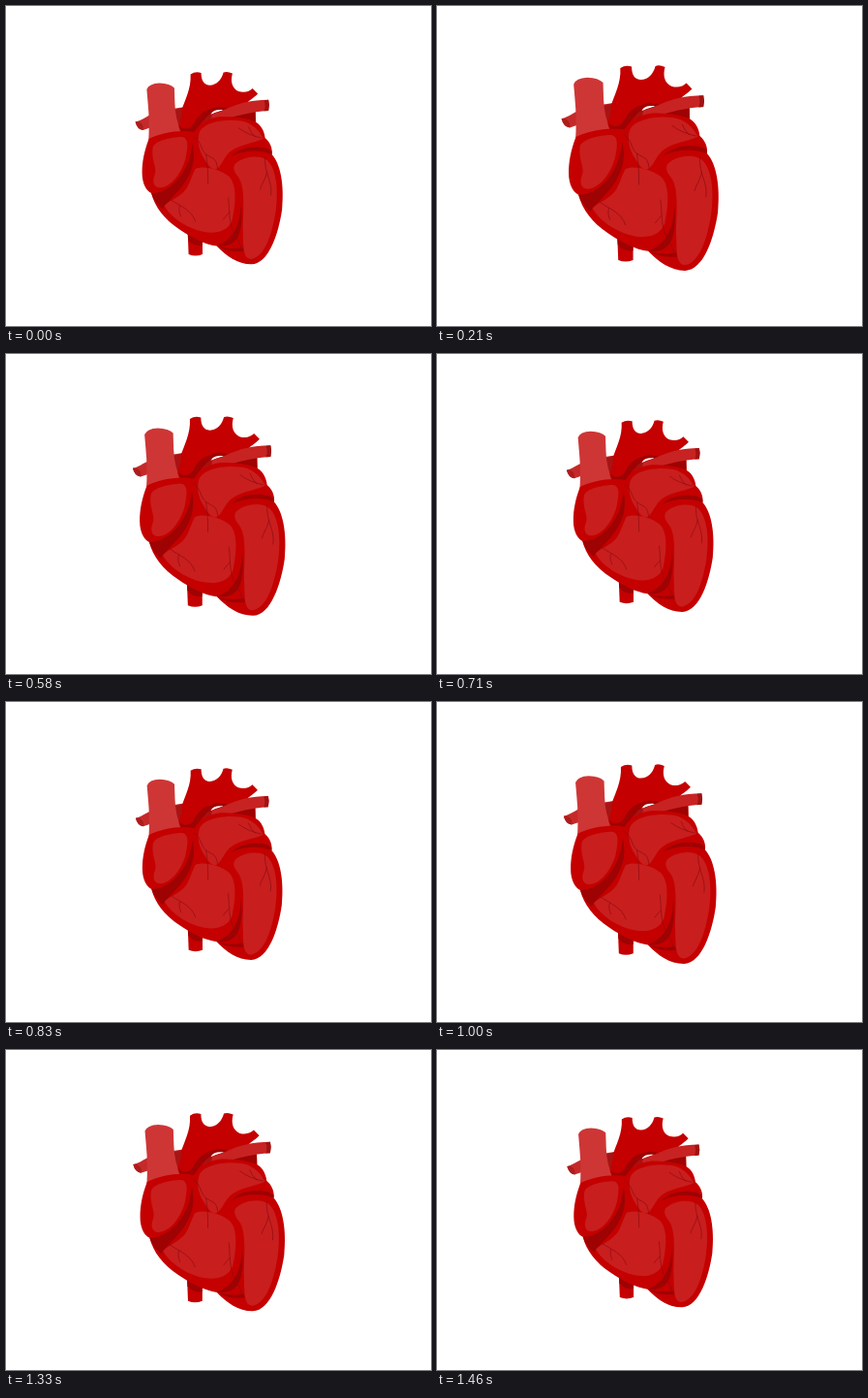
An HTML page that plays this animation: 439 by 330 pixels, repeating every 1500 ms.

```html
<!DOCTYPE html>
<html lang="en">
<head>
<meta charset="utf-8">
<title>Beating heart</title>
<style>
html, body { margin: 0; width: 100%; height: 100%; overflow: hidden; background: #fff; }
svg { display: block; width: 100vw; height: 100vh; }
.red { fill: #c40000; }
.light { fill: #c81e1e; }
.pale { fill: #ce3636; }
.dark { fill: #9e0202; }
.veins { fill: none; stroke: #8f0d12; stroke-width: .7; stroke-linecap: round; }
</style>
</head>
<body>
<svg viewBox="0 0 439 330">
  <g id="heart">
    <!-- lower vessel -->
    <path class="red" d="M188 230L189 256Q196 259 203.400 256L203.400 240Z"/>
    <path class="dark" d="M188 232L188.500 241Q194 248 203.400 247L203.400 240Z"/>

    <!-- vessels on the left -->
    <path fill="#c52a2a" d="M134 119.500C141 118 147 112.500 158 108L186 104V125L150 125.300L142 128Q136 127.500 134 119.500Z"/>
    <path fill="#ad1c1c" d="M134 119.500Q138 118.500 140 121Q143 124 142 128Q136 127.500 134 119.500Z"/>
    <path fill="#a81414" d="M174 107L186 104V134H180Q175 116 174 107Z"/>
    <path class="pale" d="M145.800 86Q148 80 159 79.500Q170 80 174.300 84.500L174.800 100Q175 116 182 132L147.500 142Q149 120 147 100Z"/>

    <!-- aorta -->
    <path class="red" d="M191 70.500Q196 67 202 69C202 77 205 81.500 211 81.700C218 81.500 223 76 225 68.500Q229 67 234.300 69.500C232 78 234 85 240.500 88C247 90 252 88 255 85L260.500 90.500C255 96 250 98 249 101L258 109L258.300 122L200 136L182 134L179 125C179 119 183 113 182 107C185 97 192 85 191 70.500Z"/>
    <path class="dark" d="M179 123C184 128 190 128 194 122C199 113 204 108 212 106C219 103 225 104 230 106L213 112C205 115 201 122 195 130L182 131Z"/>
    <path class="dark" d="M241 109L258 109L258.300 121Q245 116 234 115Z"/>
    <path fill="#fff" d="M212 111.500C214 107.500 219 106.500 225 107.300Q217 109.500 212 112Z"/>

    <!-- vessel on the right -->
    <path fill="#c72323" d="M204 121C208 111 216 111 226 107C241 100 253 97 271.500 96.800Q273 102 271.500 108C254 109 239 113 226 117L202 125Z"/>
    <path fill="#a01111" d="M267 97.200L271.500 96.800Q273 102 271.500 108L267 108.300Q269 103 267 97.200Z"/>
    <path fill="#a91010" d="M204 121Q207 112 213 111.500Q214 116 209 121L202 125Z"/>

    <!-- body -->
    <path class="red" d="M148 137C143 150 141 161 141 172C141 184 146 191 150.500 193C154 207 164 220 179 230C192 239 206 246 218 247.500C228 258 240 266.500 254 266.300C272 266 282 234 285.500 210C288 184 284 163 275 153C276 147 273 140 268 136C267 127 262 121 257 119C247 115 235 114 222 114C210 115 200 122 195 130C180 127 160 131 148 137Z"/>

    <!-- folds -->
    <path class="dark" d="M150.500 193C165 193 178 182 186 167C190 159 192 150 193 142C196 155 194 167 188 177C182 189 171 197 162 209C156 204 152 198 150.500 193Z"/>
    <path class="dark" d="M233 155C240 147 254 144.500 264 146Q272 147 275 150V153C261 147.500 245 149 233 155Z"/>
    <path class="dark" d="M243 203C243 224 236 241 218 247.300C229 249 236 245 240 238C244 229 245 216 243 203Z"/>
    <path class="dark" d="M219 248Q234 251.500 245 249L246 253Q230 254 219 248Z"/>

    <!-- panels -->
    <path class="light" d="M152 146C154 139 171 135 182 135C190 136 188 147 186 157C182 172 172 185 162 187C153 189 151 181 154 174C157 167 150 159 152 146Z"/>
    <path class="light" d="M200 131C204 118 235 115 249 120C258 124 264 131 266 137C254 142 240 143 231 151C225 157 223 165 218 168C211 170 207 160 203 154C199 146 198 138 200 131Z"/>
    <path class="light" d="M196 168C203 164 222 168 231 176C240 186 237 207 234 221C229 233 217 235 205 233C189 230 171 219 164 206C169 200 180 198 187 188C191 181 193 173 196 168Z"/>
    <path class="light" d="M237 163C245 155 262 153 270 159C280 168 282 190 279 212C275 236 268 258 254 261C244 261 246 245 245 228C246 205 247 185 240 176C235 170 235 166 237 163Z"/>

    <!-- surface veins -->
    <g class="veins">
      <path d="M195 135C203 141 201 148 207 153C214 158 218 156 219 168M207 153C209 164 209 174 209 183"/>
      <path d="M241 126Q250 133 264 136M251 125Q253 131 258 135"/>
      <path d="M268 156C267 174 276 180 274 195M270 171C268 180 264 184 263 189"/>
      <path d="M171 200C181 207 192 210 196 222M180 206Q178 210 181 217"/>
      <path d="M230 198C232 212 229 226 240 241M231 213Q228 216 225 220M240 241Q242 247 245 252"/>
    </g>
  </g>
</svg>
<script>
const LOOP = 1500;
const heart = document.getElementById("heart");

// Beat curve: [time in ms, scale]
const beat = [
  [0, 1], [210, 1.066], [335, 1.089], [460, 1.073], [580, 1.036],
  [770, 0.989], [830, 0.996], [1000, 1.036], [1080, 1.069],
  [1150, 1.088], [1210, 1.079], [1330, 1.03], [1460, 0.99]
];

function key(i) {
  const n = beat.length;
  const turn = Math.floor(i / n);
  const [t, s] = beat[i - turn * n];
  return [t + turn * LOOP, s];
}

function slope(i) {
  const [a, b, c] = [key(i - 1), key(i), key(i + 1)];
  if ((b[1] - a[1]) * (c[1] - b[1]) <= 0) return 0;
  return (c[1] - a[1]) / (c[0] - a[0]);
}

function scaleAt(t) {
  let i = 0;
  while (key(i + 1)[0] <= t) i++;
  const [t0, s0] = key(i);
  const [t1, s1] = key(i + 1);
  const d = t1 - t0, u = (t - t0) / d, v = 1 - u;
  return s0 * v * v * (1 + 2 * u) + s1 * u * u * (3 - 2 * u)
    + d * u * v * (slope(i) * v - slope(i + 1) * u);
}

function draw(t) {
  const s = scaleAt(t % LOOP);
  heart.setAttribute("transform", `translate(209.6 167) scale(${s.toFixed(4)}) translate(-210 -167)`);
}

const start = performance.now();
function tick() {
  draw(performance.now() - start);
  requestAnimationFrame(tick);
}
draw(0);
requestAnimationFrame(tick);
</script>
</body>
</html>
```
